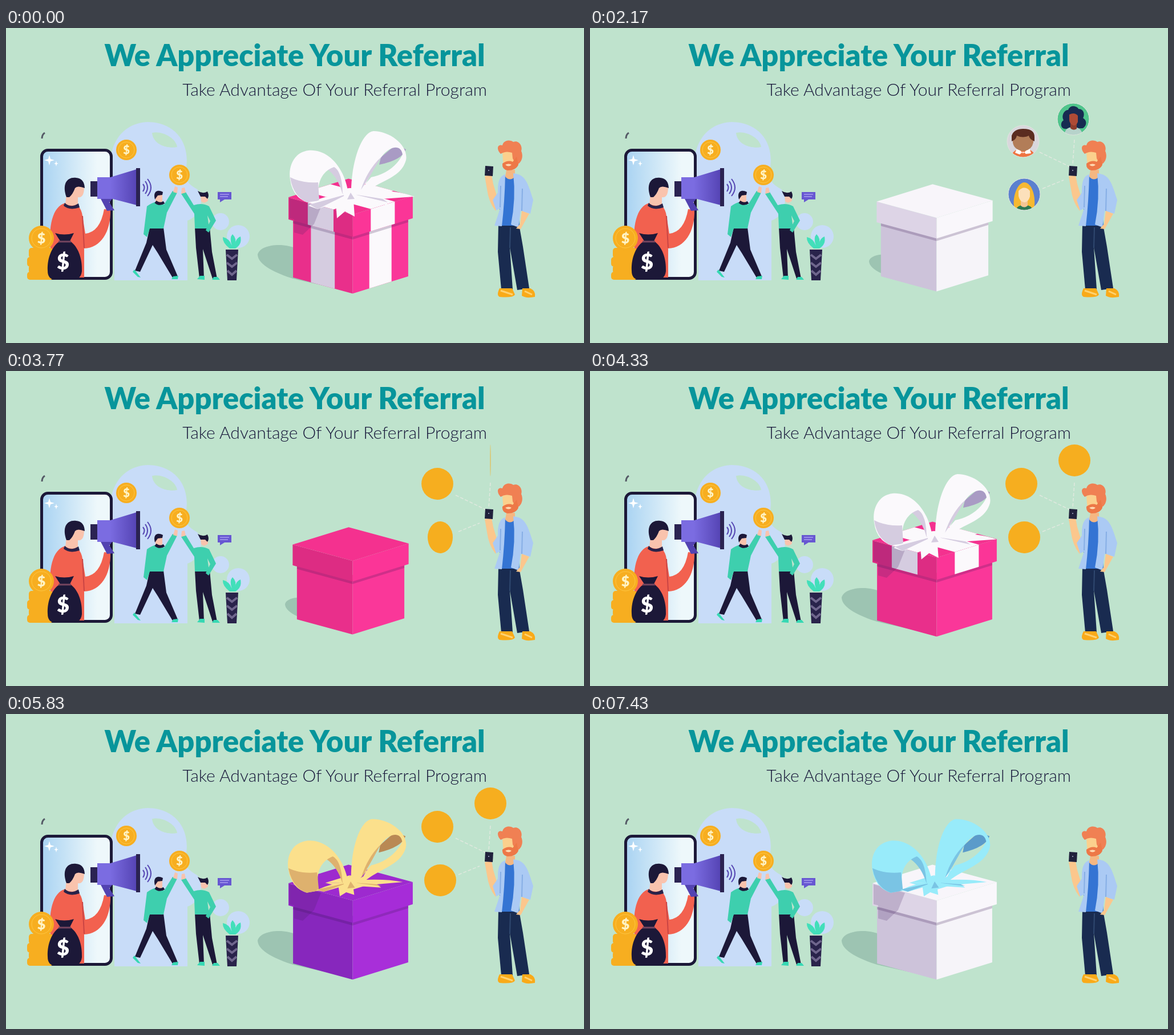
Write an HTML page that moves like this. It is 1013 px wide and 553 px high and loops after 7.51 s.

```html
<!DOCTYPE html>
<html lang="en">
<head>
<meta charset="utf-8">
<title>Referral program</title>
<style>
  html, body { margin: 0; width: 100%; height: 100%; overflow: hidden; background: #bfe3cd; }
  svg { display: block; width: 100%; height: 100%; }
  .title { font: 900 52.3px Lato, sans-serif; fill: #07959b; }
  .subtitle { font: 300 30.1px Lato, sans-serif; fill: #17173a; }
  .money { font: 900 20px Lato, sans-serif; fill: #fff3c4; text-anchor: middle; }
</style>
</head>
<body>
<svg viewBox="0 0 1013 553">
  <defs>
    <linearGradient id="screen"><stop stop-color="#a9d3f2"/><stop offset=".8" stop-color="#eef8fb"/></linearGradient>
    <linearGradient id="horn"><stop stop-color="#7a6be0"/><stop offset="1" stop-color="#5544b4"/></linearGradient>
    <clipPath id="disc"><circle r="28"/></clipPath>
  </defs>
  <text class="title" x="506" y="67" text-anchor="middle">We Appreciate Your Referral</text>
  <text class="subtitle" x="843" y="119" text-anchor="end">Take Advantage Of Your Referral Program</text>

  <!-- backdrop -->
  <g fill="#c8dcf8">
    <path d="M190 443V300C172 250 178 168 249 165C300 166 324 206 315 250C312 268 322 276 335 283C348 298 342 330 318 338V443Z"/>
    <circle cx="407" cy="366" r="20"/><circle cx="376" cy="340" r="15"/>
  </g>
  <path d="M256 184C275 180 298 194 300 209C284 212 258 206 256 184Z" fill="#bfe3cd"/>
  <path d="M63 194Q63 187 68 184" fill="none" stroke="#555a66" stroke-width="3"/>

  <!-- phone and speaker -->
  <rect x="62.500" y="214.500" width="122" height="225" rx="11" fill="url(#screen)" stroke="#1c1838" stroke-width="5"/>
  <path d="M76 223L78 230L85 232L78 234L76 241L74 234L67 232L74 230ZM88 233L89 237L92 238L89 239L88 243L87 239L84 238L87 237Z" fill="#fff"/>
  <path d="M78 388C74 340 84 309 109 306Q131 307 134 330L139 361Q165 358 172 318L183 319C184 358 166 386 137 387V438H90Z" fill="#f2614f"/>
  <path d="M134 330L137 386" fill="none" stroke="#c94444" stroke-width="2"/>
  <path d="M106 291L104 309Q117 315 126 309V297Q137 299 137 279L112 276Z" fill="#f9c3ad"/>
  <path d="M103 307Q113 317 127 308L129 315Q111 321 101 312Z" fill="#292349"/>
  <path d="M106 297C98 275 106 261 123 263Q137 264 138 281Q125 276 121 281Q117 292 111 297Z" fill="#1c1838"/>
  <path d="M164 296L188 298L181 306L190 320L177 321Z" fill="#5343b1"/>
  <path d="M148 269H162V296H148Z" fill="#2b2352"/>
  <path d="M160 262H190V300H160Z" fill="#7b6ce1"/>
  <path d="M183 262L229 248V311L183 299Z" fill="url(#horn)"/>
  <path d="M228 246H235V313H228Z" fill="#2b2352"/>
  <path d="M240 274Q245 280 240 287M244 269Q252 280 244 291M248 265Q260 280 248 295" fill="none" stroke="#5343b1" stroke-width="2"/>

  <!-- coins and bag -->
  <g fill="#f7ae20">
    <circle cx="211" cy="214" r="18"/><circle cx="304" cy="258" r="18"/>
    <rect x="40" y="386" width="42" height="18" rx="5"/><rect x="37" y="402" width="44" height="17" rx="5"/>
    <rect x="40" y="416" width="42" height="15" rx="5"/><rect x="37" y="428" width="46" height="14" rx="5"/>
    <circle cx="62" cy="369" r="22"/>
  </g>
  <g fill="none" stroke="#ffc743" stroke-width="1"><circle cx="211" cy="214" r="14"/><circle cx="304" cy="258" r="14"/><circle cx="62" cy="369" r="17"/></g>
  <text class="money" x="211" y="221">$</text><text class="money" x="304" y="265">$</text>
  <text class="money" x="62" y="378" style="font-size:25px">$</text>
  <path d="M86 360Q102 365 119 360L112 374C126 383 134 404 133 427Q131 442 117 442H86Q73 441 73 426C72 403 81 382 95 374Z" fill="#1c1838"/>
  <path d="M92 375H114" stroke="#75455f" stroke-width="3"/>
  <text class="money" x="100" y="424" style="font-size:38px;fill:#fff">$</text>

  <!-- high five -->
  <path d="M252 350H276L281 389L301 436L293 440L266 395L257 381L235 428L226 426L246 377Z" fill="#1c1838"/>
  <path d="M331 350H357L361 393L370 440H362L345 388L347 439H339L333 386Z" fill="#1c1838"/>
  <path d="M247 313Q265 299 277 310L292 286L300 289L282 324L276 352H252L247 367L241 362Z" fill="#3ecfae"/>
  <path d="M307 291L315 288L329 311Q344 306 356 313L368 338L355 359L350 355L358 339L353 329L356 352H331L330 326Z" fill="#3ecfae"/>
  <g fill="#f9c3ad"><path d="M293 288L296 278L301 280L300 290ZM307 291L308 281L313 280L315 289Z"/><path d="M262 293H274V304Q268 311 262 306ZM341 293H354V303Q347 310 342 304Z"/></g>
  <path d="M261 301C257 286 266 283 275 288L274 293L266 294ZM336 286Q345 292 353 287Q357 295 353 300L349 296L341 296Z" fill="#1c1838"/>
  <path d="M262 305Q269 311 277 306" fill="none" stroke="#1c1838" stroke-width="5"/>
  <path d="M225 424L236 438L231 437L222 428ZM293 436L302 435L301 441H290ZM335 441L340 435H348V442ZM361 442L364 437H371L375 442Z" fill="#36d8b3"/>
  <path d="M371 288H395V301H383L375 306V301H371Z" fill="#6757d2"/>
  <path d="M375 292H391M375 296H389" stroke="#aaa0f0" stroke-width="1.500"/>
  <path d="M392 387Q379 377 380 367Q391 369 396 382Q391 368 397 362Q405 370 401 380Q403 369 411 366Q414 380 402 387Z" fill="#42dfba"/>
  <path d="M385 389H407L404 443H388Z" fill="#29234b"/>
  <path d="M387 398L396 405L405 398M387 412L396 419L405 412M388 426L396 433L404 426" fill="none" stroke="#6f668d" stroke-width="4"/>

  <g id="gift"></g>
  <g id="contacts"></g>

  <!-- customer -->
  <path d="M863 344H899L906 384L917 457L896 460L883 385L888 459H868L862 393Z" fill="#192b50"/>
  <path d="M884 350L883 386" stroke="#304970" stroke-width="2"/>
  <path d="M865 457H887L892 468Q889 474 865 472Q859 469 865 457ZM905 457H919Q929 462 927 472Q911 475 904 470Z" fill="#f9aa19"/>
  <path d="M867 461L888 468M909 462L922 468" stroke="#ffd270" stroke-width="3"/>
  <path d="M839 260L851 258L854 274L863 304L858 321Q846 306 843 283Z" fill="#fbc78d"/>
  <path d="M840 242L854 243L853 260L839 259Z" fill="#20213c"/><circle cx="846" cy="250" r="1" fill="#aeb2cc"/>
  <path d="M872 260H894L900 347H862Z" fill="#3474d3"/>
  <path d="M877 249H892V261Q883 270 875 261Z" fill="#f5b782"/>
  <path d="M875 257Q861 260 862 289L853 302L859 320L866 317L856 347L869 348Q874 305 875 257ZM889 255C909 258 913 266 924 302L919 326L902 321L898 350L885 345Q894 300 889 255Z" fill="#abcaf4"/>
  <path d="M905 282L904 321M867 277L866 315" stroke="#86aee5" stroke-width="2"/>
  <path d="M904 321L917 326L902 353L894 352L901 344Z" fill="#fbc78d"/>
  <path d="M870 219Q881 211 896 219L893 243Q885 249 872 246Z" fill="#fbd08d"/>
  <path d="M867 221C859 213 861 203 870 206C872 196 885 196 889 200C899 196 906 208 903 216C908 227 902 239 894 240L888 229L887 219Q876 215 867 221Z" fill="#f08053"/>
  <path d="M870 238Q880 231 888 235L895 226L898 240Q894 250 879 250Q869 248 870 238Z" fill="#ed7847"/>
  <path d="M875 240Q881 237 886 240Q881 245 875 240Z" fill="#ffd9b2"/>
</svg>
<script>
const LOOP = 7510, PERIOD = 1600;
const giftNode = document.getElementById('gift');
const contactsNode = document.getElementById('contacts');

const palettes = [
  { left: '#e92f8b', right: '#fa3799', lidLeft: '#dd2c83', lidRight: '#fb3597', top: '#f4318f', band: '#fbf9fc', shade: '#d5cce0', dark: '#a99bc4' },
  { left: '#8727bd', right: '#a82fd9', lidLeft: '#8f27c2', lidRight: '#a62cd8', top: '#9d2acf', band: '#fbe08c', shade: '#deb16e', dark: '#b98954' },
  { left: '#cdc3da', right: '#f6f4f9', lidLeft: '#ddd4e6', lidRight: '#f9f7fb', top: '#f8f5fa', band: '#98ebfa', shade: '#7ac4e4', dark: '#5b9bca' }
];

const clamp = v => Math.max(0, Math.min(1, v));
const ramp = (t, from, to) => clamp((t - from) / (to - from));
const smooth = v => v * v * (3 - 2 * v);
const path = (d, fill, extra = '') => `<path d="${d}" fill="${fill}" ${extra}/>`;
const mix = (p, q, u) => p.map((v, i) => v + (q[i] - v) * u);

// Eased interpolation through [time, value] steps.
function track(t, steps) {
  const i = steps.findIndex(s => s[0] > t);
  if (i < 0) return steps[steps.length - 1][1];
  if (i === 0) return steps[0][1];
  const [a, from] = steps[i - 1], [b, to] = steps[i];
  return from + (to - from) * smooth((t - a) / (b - a));
}

function box(phase, c) {
  const sx = track(phase, [[640, 1], [750, 1.05], [840, .69], [950, 0], [1000, 0], [1180, 1.06], [1260, 1]]);
  const sy = track(phase, [[640, 1], [750, 1.05], [840, .83], [950, 0], [1000, 0], [1180, 1.06], [1260, 1]]);
  if (!sx) return '';

  // Corners run front, right, back, left.
  const corner = (r, y, i) => {
    const angle = (2 + 90 * i) * Math.PI / 180;
    return [604 + r * sx * Math.sin(angle), 410 + (y - 410) * sy + .29 * r * sx * Math.cos(angle)];
  };
  const poly = (points, fill) => path('M' + points.map(p => p.map(v => v.toFixed(1))).join('L') + 'Z', fill);
  const wall = (r, top, bottom, i, u0, u1, fill) => {
    const at = (y, u) => mix(corner(r, y, i), corner(r, y, i + 1), u);
    return poly([at(top, u0), at(top, u1), at(bottom, u1), at(bottom, u0)], fill);
  };
  const wrapped = phase < 970 ? 1 : 0;
  const onTop = wrapped * ramp(phase, 0, 65);
  const onLid = wrapped * ramp(phase, 55, 100);
  const onSide = wrapped * ramp(phase, 100, 250);
  const faces = [
    { i: 3, side: c.left, lid: c.lidLeft, band: c.shade, lidBand: c.shade },
    { i: 0, side: c.right, lid: c.lidRight, band: c.band, lidBand: c.band }
  ];
  let out = '';
  for (const { i, side, band } of faces) {
    out += wall(101, 325, 437, i, 0, 1, side);
    if (onSide) out += wall(101, 330, 330 + 107 * onSide, i, .3, .7, band);
    out += wall(101, 334, 342, i, 0, 1, 'rgba(55,20,80,.22)');
  }
  for (const { i, lid, lidBand } of faces) {
    out += wall(109, 296, 335, i, 0, 1, lid);
    if (onLid) out += wall(109, 296, 296 + 39 * onLid, i, .3, .7, lidBand);
  }
  const lid = [0, 1, 2, 3].map(i => corner(109, 296, i));
  out += poly(lid, c.top);
  if (onTop) {
    const middle = mix(lid[0], lid[2], .5);
    const inner = lid.map(p => mix(p, middle, .6));
    lid.forEach((p, i) => {
      const next = (i + 1) % 4, q = lid[next], a = inner[i], b = inner[next];
      out += poly([middle, a, mix(a, mix(p, q, .3), onTop), mix(b, mix(p, q, .7), onTop), b], c.band);
    });
  }
  if (phase > 1430 || phase < 690) {
    out += path('M497 299L552 314L540 344L520 363L505 359L505 336L497 334Z', '#43215f', 'opacity=".2"');
  }
  return out;
}

function bow(phase, c) {
  const dy = track(phase, [[0, 5], [100, 0], [740, 0], [840, 8], [950, 60], [1180, -150], [1300, -77], [1400, -10], [1500, 8], [1600, 5]]);
  const sx = track(phase, [[0, 1.02], [100, 1], [740, 1], [840, .85], [970, 0], [1180, 0], [1300, .9], [1500, 1.03], [1600, 1.02]]);
  const sy = track(phase, [[740, 1], [840, .93], [970, 0], [1180, 0], [1300, 1]]);
  if (!sx) return '';
  const tilt = track(phase, [[0, -2], [100, 0], [1200, 0], [1400, -3], [1600, -2]]);
  const spread = phase < 1000 ? ramp(phase, 0, 120) : 0;
  return `<g transform="translate(603 ${290 + dy}) rotate(${tilt}) scale(${sx} ${sy}) translate(-603 -290)">` +
    path('M562 247Q581 235 591 259L600 290L590 292Q582 261 562 247Z', c.shade) +
    path('M600 291C593 241 562 212 530 215C505 218 494 243 498 266Q502 297 528 306L549 303C544 277 550 253 575 244Q589 252 590 290Z', c.band) +
    path('M498 262Q520 273 547 271L549 303L528 306Q503 296 498 262Z', c.shade) +
    path('M657 227L683 205L701 213Q694 232 654 240Z', c.dark) +
    path('M605 291C604 245 620 184 644 181C674 181 706 207 701 232C692 264 656 267 626 291L612 294L640 262C666 257 686 241 695 222C692 203 672 208 659 225C647 240 637 262 626 281Z', c.band, 'fill-rule="evenodd"') +
    path('M622 284Q634 248 658 226L636 263Z', c.shade) +
    `<g transform="translate(603 290) scale(${.8 + .2 * spread} ${.55 + .45 * spread}) translate(-603 -290)">` +
    path('M600 290Q566 290 530 312L546 318L578 306L580 334L594 322L611 331L609 302L669 311L660 300L716 296Q678 282 616 285Z', c.band) +
    path('M600 291L546 318L532 310ZM610 292L669 306L660 300Z', c.shade) + '</g>' +
    path('M590 285Q603 277 617 285L612 300L594 302Z', c.band) +
    path('M598 301L604 289L611 300Z', c.shade) + '</g>';
}

function drawGift(t) {
  const phase = (t + 570) % PERIOD;
  const colors = palettes[Math.floor((t + 1190) / PERIOD) % 3];
  const shadow = track(phase, [[740, 1], [840, .865], [970, 0], [1000, 0], [1220, 1]]);
  giftNode.innerHTML =
    path('M441 398C445 379 490 376 512 389L560 410V453L503 440C475 431 442 417 441 398Z', '#9dc4b2',
      `transform="translate(604 437) scale(${shadow}) translate(-604 -437)"`) +
    box(phase, colors) + bow(phase, colors);
}

const contacts = [
  { x: 759, y: 199, start: 1000, line: 'M788 218L840 243', coin: [756, 198],
    art: path('M-28-28H28V28H-28Z', '#d9d7dc') + path('M-22 28Q-17 12 0 13Q18 12 22 28Z', '#ef7442') +
      path('M-10 11L0 21L11 11L14 21L5 22L0 18L-6 23L-14 20Z', '#fff') + path('M-18-10H18V2Q15 16 0 17Q-16 15-18 2Z', '#b27d58') +
      path('M-20 0V-10Q-16-22 0-22Q20-22 20-8V0Q11-4 10-10Q0-5-11-10Q-12-3-20 0Z', '#5b2c20') },
  { x: 761, y: 292, start: 250, line: 'M793 282L830 267', coin: [761, 292],
    art: path('M-28-28H28V28H-28Z', '#5b80cf') + path('M-17 25C-22 8-13-20 0-21C15-20 21 8 17 25Z', '#f6b832') +
      path('M-16 28Q-11 18 0 19Q12 18 16 28Z', '#2d7952') + path('M-6 8H6V20Q0 25-6 20Z', '#f3c594') +
      path('M-10-6Q0-17 10-6V4Q7 14 0 14Q-8 13-10 3Z', '#fce0bb') },
  { x: 847, y: 160, start: 1650, line: 'M849 196L846 240', coin: [849, 157],
    art: path('M-28-28H28V28H-28Z', '#50c58c') + path('M-14 17C-23 17-23 5-17 2C-22-8-14-17-9-16C-5-27 8-22 9-18C20-18 20-6 17-2C27 4 21 15 16 16Z', '#172b51') +
      path('M-16 28Q-14 13 0 14Q13 13 17 28Z', '#b7d3cb') + path('M-5 6H6V17Q0 21-5 16Z', '#8d3d2d') +
      path('M-7-8Q2-13 8-6V5Q5 12 0 11Q-7 8-7 1Z', '#ae4b36') }
];

function drawContacts(t) {
  contactsNode.innerHTML = contacts.map((c, i) => {
    const leaving = ramp(t, 7080 + i * 40, 7280 + i * 40);
    const size = smooth(ramp(t, c.start, c.start + 310)) * (1 - smooth(leaving));
    if (!size) return '';
    const turn = smooth(ramp(t, 3500 + i * 60, 3800 + i * 60)) - smooth(ramp(t, 6260 + i * 40, 6540 + i * 40));
    const showCoin = turn > .5;
    const [x, y] = showCoin ? c.coin : [c.x, c.y];
    const disc = showCoin ? '<circle r="28" fill="#f6ae1f"/>' : `<g clip-path="url(#disc)">${c.art}</g><circle r="28" fill="none" stroke="#e0e5df"/>`;
    return `<path d="${c.line}" stroke="#e0e9df" stroke-width="1.500" stroke-dasharray="6 3" opacity="${size}"/>` +
      `<g transform="translate(${x} ${y}) scale(${size * Math.abs(Math.cos(turn * Math.PI))} ${size})">${disc}</g>`;
  }).join('');
}

const began = performance.now();
function render() {
  const t = (performance.now() - began) % LOOP;
  drawGift(t);
  drawContacts(t);
  requestAnimationFrame(render);
}
render();
</script>
</body>
</html>
```
